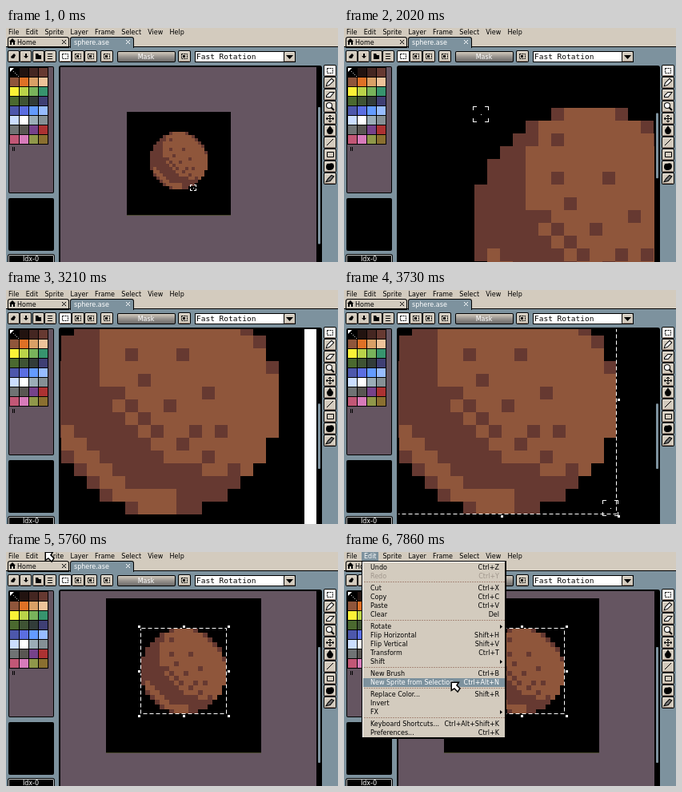
An HTML page with a canvas that plays this animation: 415x293 px, repeating every 7990 ms.

```html
<!DOCTYPE html>
<html lang="en">
<head>
<meta charset="utf-8">
<title>Pixel editor</title>
<style>
html, body { margin: 0; width: 415px; height: 293px; overflow: hidden; }
canvas { display: block; }
</style>
</head>
<body>
<canvas id="stage" width="415" height="293"></canvas>
<script>
const c = document.getElementById('stage').getContext('2d');
const LOOP = 7990;
const FACE = '#d3cbbe', BLUE = '#7d929e', WORK = '#655561', INK = '#000', WHITE = '#fff';
const LIGHT = '#8f563b', DARK = '#663931';
const UI = '8px "DejaVu Sans", sans-serif';
const VIEW = { x: 68, y: 49, w: 320, h: 244 };
const LEVELS = [4, 5, 6, 8, 10, 12, 16];
const BAR = ['File', 'Edit', 'Sprite', 'Layer', 'Frame', 'Select', 'View', 'Help'];

const MENU = [['Undo', 'Ctrl+Z'], ['Redo', 'Ctrl+Y'], null,
  ['Cut', 'Ctrl+X'], ['Copy', 'Ctrl+C'], ['Paste', 'Ctrl+V'], ['Clear', 'Del'], null,
  ['Rotate', '>'], ['Flip Horizontal', 'Shift+H'], ['Flip Vertical', 'Shift+V'],
  ['Transform', 'Ctrl+T'], ['Shift', '>'], null,
  ['New Brush', 'Ctrl+B'], ['New Sprite from Selection', 'Ctrl+Alt+N'], null,
  ['Replace Color...', 'Shift+R'], ['Invert', ''], ['FX', '>'], null,
  ['Keyboard Shortcuts...', 'Ctrl+Alt+Shift+K'], ['Preferences...', 'Ctrl+K']];

// Swatches are short ramps: first colour, last colour, length.
const RAMPS = ['000000 663931 4', '8f563b df7126 2', 'd9a066 eec39a 2', 'fbf236 37946e 4',
  '4b692f 323c39 3', '3f3f74 5b6ee1 3', '639bff ffffff 4', '9badb7 595652 4',
  '76428a 76428a 1', 'ac3232 d77bba 3', '8f974a 8a6f30 2'];

function ramp(spec) {
  const [a, b, n] = spec.split(' ');
  const part = (hex, i) => parseInt(hex.substr(i * 2, 2), 16);
  return Array.from({ length: +n }, (_, k) => {
    const mix = i => Math.round(part(a, i) + (part(b, i) - part(a, i)) * k / Math.max(1, n - 1));
    return `rgb(${mix(0)}, ${mix(1)}, ${mix(2)})`;
  });
}
const PALETTE = RAMPS.flatMap(ramp);

// Each move: start, end, then the place it eases to.
const SCROLL = [[2700, 3200, -59, -103], [4080, 4480, -76, -111], [4500, 4820, -40, -102]];
const MOUSE = [[60, 500, 186, 140], [1400, 1980, 171, 108], [2450, 2750, 381, 285],
  [3240, 3700, 333, 273], [4080, 4820, 225, 156], [5400, 5750, 49, 0], [5760, 5850, 34, 8],
  [5850, 6870, 85, 149], [6900, 7400, 130, 162], [7520, 7860, 134, 163]];

function follow(x, y, moves, t) {
  for (const [t0, t1, tx, ty] of moves) {
    const u = Math.min(1, Math.max(0, (t - t0) / (t1 - t0))), e = u * u * (3 - 2 * u);
    x += (tx - x) * e;
    y += (ty - y) * e;
  }
  return [Math.round(x), Math.round(y)];
}

function camera(t) {
  const step = t < 5010 ? Math.min(6, Math.floor(t / 250))
    : Math.max(2, 5 - Math.floor((t - 5010) / 120));
  const z = LEVELS[step];
  const [sx, sy] = follow(51, 4, SCROLL, t);
  const [px, py] = t < 2450 ? [185.67, 140] : [225, 156];
  const about = (p, o) => Math.round(p - (p - o) * z / 16);
  return { z, x: about(px, sx), y: about(py, sy) };
}

const isHand = t => t >= 4080 && t < 4900;

function pointer(t, cam) {
  return isHand(t) ? [265 + cam.x, 258 + cam.y] : follow(234, 200, MOUSE, t);
}

function box(x, y, w, h, fill) {
  c.fillStyle = fill;
  c.fillRect(x, y, w, h);
}

function text(s, x, mid, fill = INK, align = 'left', font = UI) {
  c.font = font;
  c.textAlign = align;
  c.fillStyle = fill;
  c.fillText(s, x, mid + 3);
}

function round(x, y, w, h, r, fill) {
  c.fillStyle = fill;
  c.beginPath();
  c.roundRect(x, y, w, h, r);
  c.fill();
}

function shape(d, x, y, fill, line, width = 1) {
  c.save();
  c.translate(x, y);
  const p = new Path2D(d);
  if (line) { c.strokeStyle = line; c.lineWidth = width; c.stroke(p); }
  if (fill) { c.fillStyle = fill; c.fill(p); }
  c.restore();
}

function button(x, y, w, h, fill = FACE) {
  round(x, y, w, h, 2, INK);
  round(x + 1, y + 1, w - 2, h - 2, 1, fill);
  box(x + 2, y + 1, w - 4, 1, '#f4efe6');
  box(x + 2, y + h - 2, w - 4, 1, '#968275');
}

function dotted(x, y, w, h) {
  c.save();
  c.setLineDash([2, 1]);
  c.strokeStyle = INK;
  c.lineWidth = 1;
  c.strokeRect(x + .5, y + .5, w, h);
  c.restore();
}

function drawTop() {
  box(0, 0, 415, 293, BLUE);
  box(0, 0, 415, 24, FACE);
  let x = 3;
  for (const name of BAR) {
    text(name, x, 5);
    x += c.measureText(name).width + 8.3;
  }
  round(2, 11, 77, 14, [3, 3, 0, 0], INK);
  round(3, 12, 75, 12, [2, 2, 0, 0], FACE);
  shape('M0 4 4 0 8 4H7V8H5V5H3V8H1V4Z', 4, 13, INK);
  text('Home', 14, 18);
  shape('M0 0 5 5M5 0 0 5', 70, 15, null, INK);
  box(0, 23, 415, 1, INK);
  round(80, 11, 80, 14, [3, 3, 0, 0], INK);
  round(81, 12, 78, 14, [2, 2, 0, 0], BLUE);
  text('sphere.ase', 85, 18, WHITE);
  shape('M0 0 5 5M5 0 0 5', 150, 15, null, WHITE);
}

function drawToolbar() {
  for (let i = 0; i < 4; i++) button(2 + i * 15.5 | 0, 28, 15, 15);
  shape('M0 4 4 0 6 2 4 6H1Z', 6, 32, INK);
  shape('M2 0H4V3H6L3 6 0 3H2Z', 22, 32, INK);
  shape('M0 0H3L4 2H7V7H0Z', 37, 32, INK);
  shape('M0 .5H6M0 3.5H6M0 6.5H6', 52, 32, null, INK);

  [66, 82, 98, 118, 215].forEach((x, i) => {
    button(x, 28, 16, 15, i ? FACE : WHITE);
    dotted(x + 4, 32, 7, 6);
    if (i) box(x + 6, 34, 3, 3, INK);
  });
  round(139, 29, 73, 14, 2, INK);
  const g = c.createLinearGradient(0, 30, 0, 42);
  g.addColorStop(0, '#d3cbbe');
  g.addColorStop(.5, '#98938e');
  g.addColorStop(1, '#6c6a69');
  round(140, 30, 71, 12, 1, g);
  text('Mask', 175, 36, WHITE, 'center');

  box(236, 29, 126, 14, INK);
  box(237, 30, 111, 12, WHITE);
  text('Fast Rotation', 238, 36, INK, 'left', '9.5px "DejaVu Sans Mono", monospace');
  button(347, 29, 15, 14);
  shape('M0 0H9L4.5 5Z', 350, 34, INK);
}

function drawSidebar() {
  round(3, 48, 57, 159, 2, INK);
  round(4, 49, 55, 157, 1, WORK);
  box(4, 49, 49, 97, INK);
  PALETTE.forEach((fill, i) => box(5 + i % 4 * 12, 50 + (i >> 2) * 12, 11, 11, fill));
  shape('M0 0H5L0 5Z', 5, 50, WHITE);
  for (let i = 0; i < 4; i++) box(9 + i * 2, 54 + i * 2, 1, 1, '#bbb');
  box(8, 149, 1, 5, INK);
  box(10, 149, 1, 5, INK);
  round(3, 213, 57, 66, 2, INK);
  round(2, 283, 59, 14, 3, INK);
  round(3, 284, 57, 14, 2, '#c4c8c8');
  round(4, 285, 55, 14, 1, INK);
  text('Idx-0', 31, 289, WHITE, 'center');
}

function drawTools() {
  const icons = ['', 'M1 8 2 5 7 0 9 2 4 7Z', 'M1 6 5 2H9L5 7H1Z',
    'M1 3A3 3 0 1 0 7 3A3 3 0 1 0 1 3M6 5 10 9',
    'M5 0V9M.5 4.5H9.5M3 2 5 0 7 2M3 7 5 9 7 7M2 3 0 4.5 2 6M8 3 10 4.5 8 6',
    'M5 0 8 4Q8 8 5 8Q2 8 2 4Z', 'M1 8 9 0', 'M1.5 1.5H9.5V7.5H1.5Z',
    'M1 5Q1 1 4 2Q9 0 9 4Q9 8 4 8Q1 8 1 5Z', 'M1 8 3 5 7 1 9 2 5 7Z'];
  const fills = { 1: WHITE, 2: WHITE, 3: WHITE, 5: INK, 8: INK, 9: '#777' };
  icons.forEach((d, i) => {
    const y = 46 + i * 15;
    button(397, y, 16, 15, i ? FACE : WHITE);
    shape(d, 400, y + 3, fills[i], INK, fills[i] ? 2 : 1);
  });
  dotted(401, 50, 7, 6);
}

const inDisc = (i, j) => (i - 8.5) ** 2 + (j - 8.5) ** 2 < 80;
const LOOSE = new Set('6,2 6,5 10,5 7,7 12,8 9,9 11,11 13,11'.split(' '));

function isDark(i, j) {
  const corner = !inDisc(i, j - 1) && (!inDisc(i - 1, j) || !inDisc(i + 1, j));
  const dither = j > 7 && j < 12 && i === j - 3 || j > 11 && j < 15 && i === 2 * j - 14;
  if (corner || dither || LOOSE.has(i + ',' + j)) return true;
  const edge = Math.hypot(i - 9, j - 8.2);
  const rim = j > 10 && i < 10 && edge > 7.6 && edge < 9.05;
  const lit = Math.hypot(Math.min(0, i - 12.85), j - 5) < 9.1;
  return !lit && !rim;
}

function drawSphere({ x, y, z }) {
  for (let j = 0; j < 18; j++) for (let i = 0; i < 18; i++) {
    if (inDisc(i, j)) box(x + (i + 7) * z, y + (j + 6) * z, z, z, isDark(i, j) ? DARK : LIGHT);
  }
}

function ants(x, y, w, h, t) {
  c.save();
  c.lineWidth = 1;
  c.strokeStyle = INK;
  c.strokeRect(x + .5, y + .5, w - 1, h - 1);
  c.setLineDash([5, 3]);
  c.lineDashOffset = -Math.floor(t / 100);
  c.strokeStyle = WHITE;
  c.strokeRect(x + .5, y + .5, w - 1, h - 1);
  c.restore();
}

function handles(x, y, size) {
  for (let i = -1; i < 2; i++) for (let j = -1; j < 2; j++) {
    if (!i && !j) continue;
    const hx = x + size * (i + 1) / 2 + i * 2, hy = y + size * (j + 1) / 2 + j * 2;
    box(hx - 2, hy - 2, 5, 5, INK);
    box(hx - 1, hy - 1, 3, 3, WHITE);
  }
}

function brackets(x, y, z) {
  const arm = Math.max(2, Math.round(z / 4));
  for (const sx of [0, 1]) for (const sy of [0, 1]) {
    const bx = sx ? x + z + 1 : x - 2, by = sy ? y + z + 1 : y - 2;
    box(sx ? bx - arm : bx, by, arm + 1, 1, WHITE);
    box(bx, sy ? by - arm : by, 1, arm + 1, WHITE);
  }
  box(x + (z >> 1), y + (z >> 1), 1, 1, WHITE);
}

function drawEditor(t, cam, mx, my) {
  const { x, y, z } = cam;
  round(66, 47, 329, 260, 3, INK);
  box(VIEW.x, VIEW.y, VIEW.w, VIEW.h, WORK);
  const content = 32 * z + 222;
  round(390, 48 + 245 * (179 - y) / content, 3, 245 * 245 / content, 1, BLUE);

  c.save();
  c.beginPath();
  c.rect(VIEW.x, VIEW.y, VIEW.w, VIEW.h);
  c.clip();
  box(x - 1, y - 1, 32 * z + 2, 32 * z + 2, INK);
  box(x - 1, y + 32 * z, 32 * z + 2, 1, '#4b4a30');
  drawSphere(cam);

  const col = Math.floor((mx - x) / z), row = Math.floor((my - y) / z);
  const flash = t >= 3190 && t < 3240;
  const left = x + 7 * z, top = y + 6 * z;
  if (flash) {
    box(x + 27 * z, VIEW.y, z, VIEW.h, WHITE);
  } else if (t >= 3700) {
    ants(left, top, 18 * z, 18 * z, t);
    handles(left, top, 18 * z);
  } else if (t >= 2260) {
    ants(left, top, Math.max(1, col - 6) * z, Math.max(1, row - 5) * z, t);
  }
  const inside = mx >= VIEW.x && my >= VIEW.y;
  if (inside && !isHand(t) && !flash && t < 5760) brackets(x + col * z, y + row * z, z);
  c.restore();
}

function drawMenu(my) {
  box(22, 0, 21, 11, BLUE);
  text('Edit', 25, 5, WHITE);
  box(22, 11, 181, 223, INK);
  box(23, 12, 178, 220, WHITE);
  box(24, 13, 177, 219, FACE);
  let y = 19;
  for (const item of MENU) {
    if (!item) {
      for (let x = 25; x < 200; x += 3) box(x, y - 4, 2, 1, '#a98b7c');
      y += 4;
      continue;
    }
    const [label, key] = item;
    const over = Math.abs(my - 3 - y) < 5.5;
    if (over) box(24, y - 5, 177, 11, BLUE);
    const ink = over ? WHITE : label === 'Redo' ? '#a0968c' : INK;
    text(label, 33, y, ink);
    if (key === '>') shape('M0 0 3 2.5 0 5Z', 195, y - 2, ink);
    else text(key, 194, y, ink, 'right');
    y += 11;
  }
}

function drawPointer(t, mx, my) {
  if (isHand(t)) {
    shape('M-4 0Q-6-1-5 1L-2 6H4L5 2V-3Q4-5 3-3Q3-6 1-5Q0-7-1-5Q-3-6-3-3V1Z', mx, my, WHITE, INK, 2);
    shape('M-1-4V0M1-4V0M3-3V0', mx, my, null, '#555', .6);
  } else if (t >= 5820 || mx < VIEW.x || my < VIEW.y) {
    shape('M1 1H8L6 4 10 8 8 11 4 7 1 9Z', mx, my, WHITE, INK, 3);
  }
}

function draw(t) {
  const cam = camera(t), [mx, my] = pointer(t, cam);
  drawTop();
  drawToolbar();
  drawSidebar();
  drawTools();
  drawEditor(t, cam, mx, my);
  if (t >= 5820) drawMenu(my);
  drawPointer(t, mx, my);
}

const start = performance.now();
function tick() {
  draw((performance.now() - start) % LOOP);
  requestAnimationFrame(tick);
}
tick();
</script>
</body>
</html>
```
